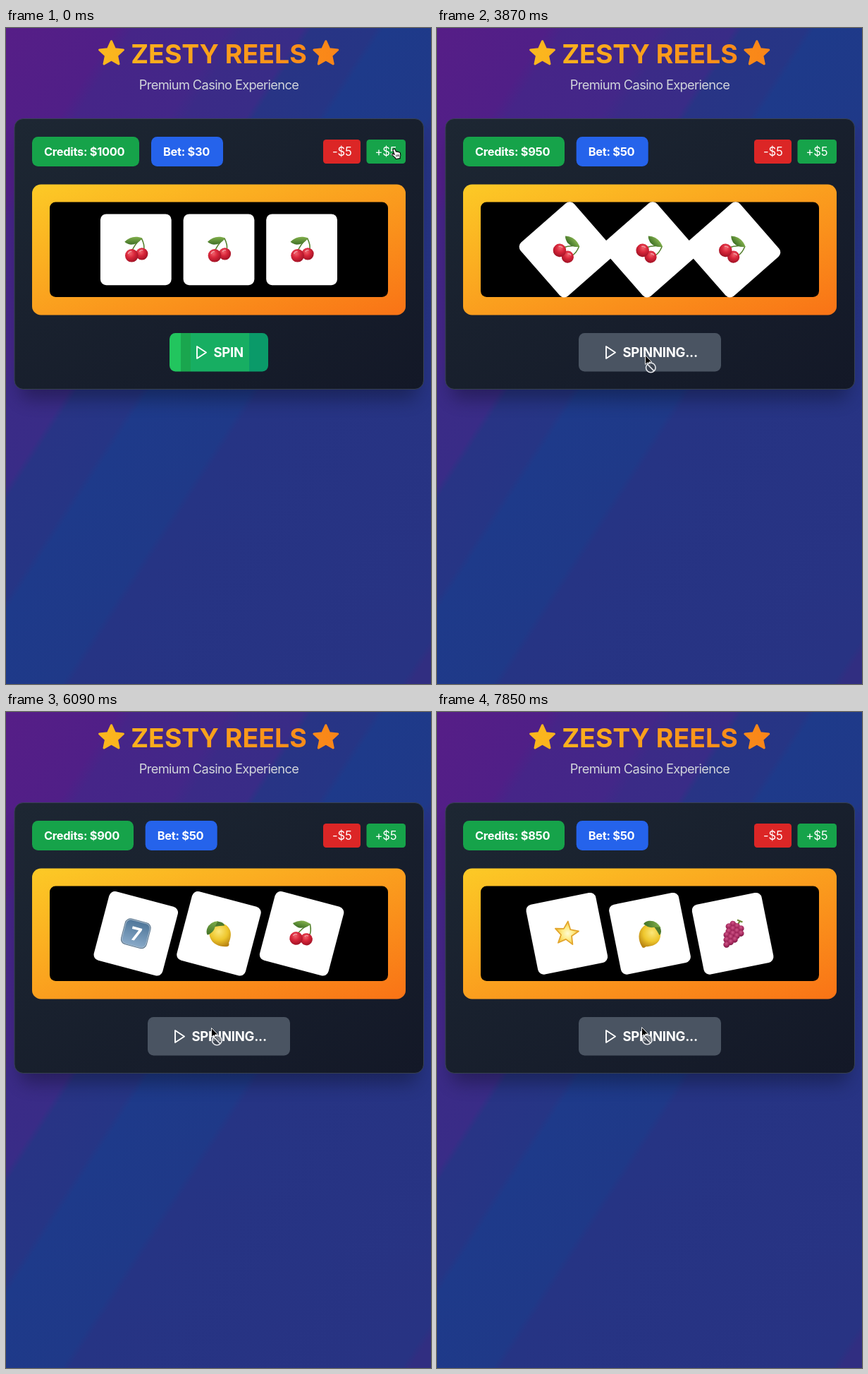
Animation, 603 px wide and 929 px high, one loop 8 s. Source, as an HTML page:

```html
<!DOCTYPE html>
<html lang="en">
<head>
<meta charset="utf-8">
<title>Slot machine</title>
<style>
  html, body { margin: 0; width: 100%; height: 100%; overflow: hidden; background: #273484; }
  svg { display: block; width: 100vw; height: 100vh; }
  text { font-family: Inter, "Open Sans", sans-serif; fill: #fff; }
  .title { font-size: 37.5px; font-weight: 700; text-anchor: middle; fill: url(#gold); }
  .sub { font-size: 18.3px; letter-spacing: -.65px; text-anchor: middle; fill: #d1d5db; }
  .label { font-size: 16.4px; font-weight: 700; letter-spacing: -.29px; }
  .step { font-size: 16.6px; letter-spacing: -.2px; }
  .spin { font-size: 18.5px; font-weight: 700; letter-spacing: -.25px; }
</style>
</head>
<body>
<svg viewBox="0 0 603 929" preserveAspectRatio="none">
  <defs>
    <linearGradient id="sky" x2="1" y2="1">
      <stop offset="0" stop-color="#561e87"/><stop offset=".13" stop-color="#501f87"/>
      <stop offset=".15" stop-color="#462588"/><stop offset=".26" stop-color="#432788"/>
      <stop offset=".28" stop-color="#3b2b87"/><stop offset=".35" stop-color="#392c87"/>
      <stop offset=".36" stop-color="#283485"/><stop offset=".435" stop-color="#263585"/>
      <stop offset=".445" stop-color="#1e3a8a"/><stop offset=".565" stop-color="#1f3988"/>
      <stop offset=".575" stop-color="#263484"/><stop offset=".965" stop-color="#283383"/>
      <stop offset=".975" stop-color="#312e81"/>
    </linearGradient>
    <linearGradient id="gold" gradientUnits="userSpaceOnUse" x1="12" x2="592" y1="0" y2="0">
      <stop stop-color="#fcca20"/><stop offset="1" stop-color="#f97316"/>
    </linearGradient>
    <linearGradient id="panel" x2="1" y2="1">
      <stop stop-color="#fcca26"/><stop offset="1" stop-color="#f97316"/>
    </linearGradient>
    <linearGradient id="card" x2="1" y2="1">
      <stop stop-color="#1d2733"/><stop offset="1" stop-color="#131827"/>
    </linearGradient>
    <linearGradient id="smooth">
      <stop stop-color="#22c55e"/><stop offset="1" stop-color="#059669"/>
    </linearGradient>
    <linearGradient id="banded">
      <stop offset=".115" stop-color="#22c55e"/><stop offset=".115" stop-color="#1aa64e"/>
      <stop offset=".215" stop-color="#1aa64e"/><stop offset=".215" stop-color="#17ae62"/>
      <stop offset=".805" stop-color="#17ae62"/><stop offset=".805" stop-color="#0a9a69"/>
    </linearGradient>
    <radialGradient id="red" cx=".4" cy=".35" r=".7">
      <stop stop-color="#f0606a"/><stop offset=".45" stop-color="#d8263a"/><stop offset="1" stop-color="#9c1023"/>
    </radialGradient>
    <radialGradient id="yellow" cx=".42" cy=".38" r=".7">
      <stop stop-color="#fbe77a"/><stop offset=".55" stop-color="#eec62c"/><stop offset="1" stop-color="#b98412"/>
    </radialGradient>
    <radialGradient id="glow">
      <stop stop-color="#fffbd2"/><stop offset=".5" stop-color="#fdeb88"/><stop offset="1" stop-color="#f6c63a"/>
    </radialGradient>
    <radialGradient id="wine" cx=".4" cy=".35" r=".7">
      <stop stop-color="#cf5688"/><stop offset=".6" stop-color="#a3285c"/><stop offset="1" stop-color="#741540"/>
    </radialGradient>
    <linearGradient id="key" x2="0" y2="1">
      <stop stop-color="#4f7699"/><stop offset="1" stop-color="#88a9c8"/>
    </linearGradient>
    <linearGradient id="leaf" x2="0" y2="1">
      <stop stop-color="#82b04c"/><stop offset="1" stop-color="#3f7026"/>
    </linearGradient>
    <filter id="blur" x="-20%" y="-20%" width="140%" height="140%"><feGaussianBlur stdDeviation="13"/></filter>

    <g id="cherry">
      <path d="M8-16Q-2-8-6 3M8-16Q13-6 11 0" fill="none" stroke="#55802f" stroke-width="1.6"/>
      <path d="M-16-11Q-8-19 2-18Q8-17 9-16Q2-7-7-7Q-13-8-16-11Z" fill="url(#leaf)"/>
      <circle cx="8.5" cy="6" r="8.6" fill="url(#red)"/><circle cx="-6" cy="8.5" r="9.3" fill="url(#red)"/>
      <path d="M-11 6q2-4 5-3M5 3q2-3 5-2" fill="none" stroke="#fff" stroke-opacity=".45" stroke-width="1.5"/>
    </g>
    <g id="lemon">
      <path d="M-14-4C-9-16 4-18 12-11C18-6 18 3 17 9Q20 14 15 15C6 18-5 17-11 8Q-15 2-14-4Z" fill="url(#yellow)"/>
      <path d="M-5-17Q-17-13-18-2Q-18 4-15 6Q-9 1-8-4Q-8-10-5-17Z" fill="url(#leaf)"/>
      <path d="M-6-16Q2-18 5-13Q-2-11-8-8Z" fill="#4d7a2c"/>
    </g>
    <g id="seven">
      <rect x="-19" y="-19" width="38" height="38" rx="8" fill="#557088"/>
      <rect x="-17.6" y="-17.6" width="35.2" height="35.2" rx="7" fill="url(#key)" stroke="#a9bccd" stroke-width="1"/>
      <path d="M-7-9H7V-6L0 10H-4L2.600-5.300H-7Z" fill="#fff"/>
    </g>
    <g id="star"></g>
    <g id="grape" transform="rotate(-49)"></g>

    <g id="hand">
      <path d="M2.800 1.600c.9-.9 2-.4 2.400.5l1.300 3.200c.6-.7 1.800-.5 2.100.3c.7-.6 1.700-.2 2 .5c.9-.3 1.600.2 1.800 1l.4 3.500-.8 2 .3 2-6.200.9-1-1.900-4.200-3.700c-.9-1 .2-2.200 1.400-1.600l1.800 1-2-5.800c-.2-.8.2-1.600.7-1.900z"
        fill="#fff" stroke="#000" stroke-width="1.100" stroke-linejoin="round"/>
      <path d="M6.600 9.500l.4 3M8.500 9.200l.3 3M10.300 9l.2 3" stroke="#000" stroke-width=".8"/>
    </g>
    <g id="arrow">
      <path d="M.5.5V13.500L3.500 10.700 5.600 15.500 7.600 14.600 5.600 10H9.800Z" fill="#000" stroke="#fff" stroke-width=".9"/>
    </g>
    <g id="no">
      <use href="#arrow"/>
      <circle cx="8.300" cy="18" r="6.800" fill="#333a45" fill-opacity=".6" stroke="#e5e7eb" stroke-width="1.600"/>
      <path d="M3.700 13.400l9.200 9.200" stroke="#e5e7eb" stroke-width="1.600"/>
    </g>
  </defs>

  <rect width="603" height="929" fill="url(#sky)"/>
  <g id="titleStars" fill="url(#gold)" stroke="url(#gold)" stroke-width="3" stroke-linejoin="round"></g>
  <text class="title" x="302" y="50">ZESTY REELS</text>
  <text class="sub" x="302" y="86.500">Premium Casino Experience</text>

  <rect x="20" y="154" width="564" height="372" rx="12" fill="#000" opacity=".3" filter="url(#blur)"/>
  <rect x="12" y="128.500" width="580.500" height="383" rx="12.500" fill="url(#card)" stroke="#374151"/>

  <rect id="creditBox" x="37" y="154" width="152" height="42" rx="8.400" fill="#16a34a"/>
  <text id="creditText" class="label" x="54" y="181"></text>
  <g id="bet">
    <rect y="154" width="102" height="42" rx="8.400" fill="#2563eb"/>
    <text id="betText" class="label" x="17" y="181"></text>
  </g>
  <rect x="450" y="158" width="53" height="34" rx="4.200" fill="#dc2626"/>
  <text class="step" x="463" y="181">-$5</text>
  <rect x="511.500" y="158" width="55.500" height="34" rx="4.200" fill="#16a34a"/>
  <text class="step" x="523.500" y="181">+$5</text>

  <rect x="37" y="221.500" width="530" height="185" rx="12.600" fill="url(#panel)"/>
  <rect x="62" y="246.500" width="480" height="134.500" rx="8.400" fill="#000"/>
  <g id="reels"></g>

  <rect id="button" y="432" height="54.500" rx="8.400"/>
  <g id="buttonLabel">
    <path d="M271 451L284 459.500L271 468Z" fill="none" stroke="#fff" stroke-width="1.900" stroke-linejoin="round"/>
    <text id="buttonText" class="spin" x="294.500" y="466"></text>
  </g>
  <use id="cursor"/>
</svg>

<script>
const LOOP = 8000, TICK = 148.1, TURN = 1000;
const $ = id => document.getElementById(id);

function add(parent, tag, attrs) {
  const node = document.createElementNS('http://www.w3.org/2000/svg', tag);
  set(node, attrs);
  return parent.appendChild(node);
}
function set(node, attrs) {
  for (const key in attrs) node.setAttribute(key, attrs[key]);
}

function starPoints(cx, cy, outer, inner) {
  return Array.from({ length: 10 }, (_, i) => {
    const r = i % 2 ? inner : outer, a = (i * 36 - 90) * Math.PI / 180;
    return (cx + r * Math.cos(a)).toFixed(2) + ',' + (cy + r * Math.sin(a)).toFixed(2);
  }).join(' ');
}
for (const x of [149.5, 453.8]) add($('titleStars'), 'polygon', { points: starPoints(x, 36.5, 17.8, 8.4) });
add($('star'), 'polygon', {
  points: starPoints(0, 0.5, 17.5, 8), fill: 'url(#glow)', stroke: '#e2a52c', 'stroke-width': 1.8, 'stroke-linejoin': 'round'
});

// Grape bunch: rows of berries narrowing to a tip, below a short stem.
add($('grape'), 'path', { d: 'M0-12V-21M-4-20L4-21', stroke: '#6f8a35', 'stroke-width': 2.2, fill: 'none' });
[3, 4, 3, 3, 2, 1].forEach((count, row) => {
  for (let i = 0; i < count; i++)
    add($('grape'), 'circle', { cx: (i - (count - 1) / 2) * 6.6, cy: -12 + row * 6, r: 4.4, fill: 'url(#wine)' });
});

const reels = [184.3, 302, 419.6].map(x => {
  const place = add($('reels'), 'g', { transform: `translate(${x} 313.8)` });
  const face = add(place, 'g', {});
  add(face, 'rect', { x: -50.4, y: -50.4, width: 100.8, height: 100.8, rx: 8.4, fill: '#fff' });
  return { face, symbol: add(face, 'use', {}) };
});

// Each table row starts at the time given first.
const bets = [[0, 30], [290, 35], [585, 40], [875, 45], [1325, 50], [1620, 55], [2365, 50]];
const results = [
  [0, 'cherry', 'cherry', 'cherry'],
  [4715, 'seven', 'lemon', 'cherry'],
  [7031, 'star', 'lemon', 'grape']
];
const spins = [
  { from: 3700, zero: 3715, credits: 950 },
  { from: 6031, zero: 6031, credits: 900 },
  { from: 7631, zero: 7631, credits: 850 }
];
const pointer = [
  [0, 547, 170, 'hand'], [1930, 547, 170, 'hand'], [2070, 469, 169, 'hand'],
  [2370, 469, 169, 'hand'], [2515, 440, 235, 'arrow'], [2665, 375, 350, 'arrow'],
  [2810, 300, 470, 'hand'], [2960, 250, 555, 'arrow'], [3105, 214, 580, 'arrow'],
  [3255, 255, 525, 'arrow'], [3405, 291, 462, 'hand'], [3700, 295, 463, 'no'],
  [3851, 295, 463, 'no'], [4440, 250, 479, 'no'], [4735, 248, 479, 'hand'],
  [4885, 248, 478, 'hand'], [5330, 291, 447, 'hand'], [5770, 290, 448, 'hand'],
  [6060, 291, 447, 'no'], [7100, 291, 447, 'hand'], [7690, 290, 446, 'no'], [LOOP, 290, 446, 'no']
];

const current = (rows, t) => rows.findLast(row => row[0] <= t);

function pointerAt(t) {
  const i = pointer.findLastIndex(row => row[0] <= t);
  const [t0, x0, y0, kind] = pointer[i], [t1, x1, y1] = pointer[i + 1];
  const k = (t - t0) / (t1 - t0);
  return { x: x0 + (x1 - x0) * k, y: y0 + (y1 - y0) * k, kind };
}

function render(time) {
  const t = Math.floor(time / TICK) * TICK;
  const spin = spins.findLast(s => s.from <= t);
  const spinning = !!spin && t < spin.zero + TURN;
  const angle = spinning ? Math.max(0, t - spin.zero) * 360 / TURN : 0;

  const symbols = current(results, t).slice(1);
  reels.forEach(({ face, symbol }, i) => {
    set(face, { transform: `rotate(${angle})` });
    set(symbol, { href: '#' + symbols[i] });
  });

  $('creditText').textContent = 'Credits: $' + (spin ? spin.credits : 1000);
  set($('creditBox'), { width: spin ? 144 : 152 });
  $('betText').textContent = 'Bet: $' + current(bets, t)[1];
  set($('bet'), { transform: `translate(${spin ? 197.7 : 206} 0)` });

  set($('button'), spinning
    ? { x: 201, width: 202, fill: '#4a5462' }
    : { x: 232, width: 140, fill: spin ? 'url(#smooth)' : 'url(#banded)' });
  set($('buttonLabel'), { transform: `translate(${spinning ? -31 : 0} 0)` });
  $('buttonText').textContent = spinning ? 'SPINNING...' : 'SPIN';

  const { x, y, kind } = pointerAt(t);
  set($('cursor'), { href: '#' + kind, transform: `translate(${x} ${y})` });
}

const start = performance.now();
function loop(now) {
  render(Math.max(0, now - start) % LOOP);
  requestAnimationFrame(loop);
}
render(0);
requestAnimationFrame(loop);
</script>
</body>
</html>
```
